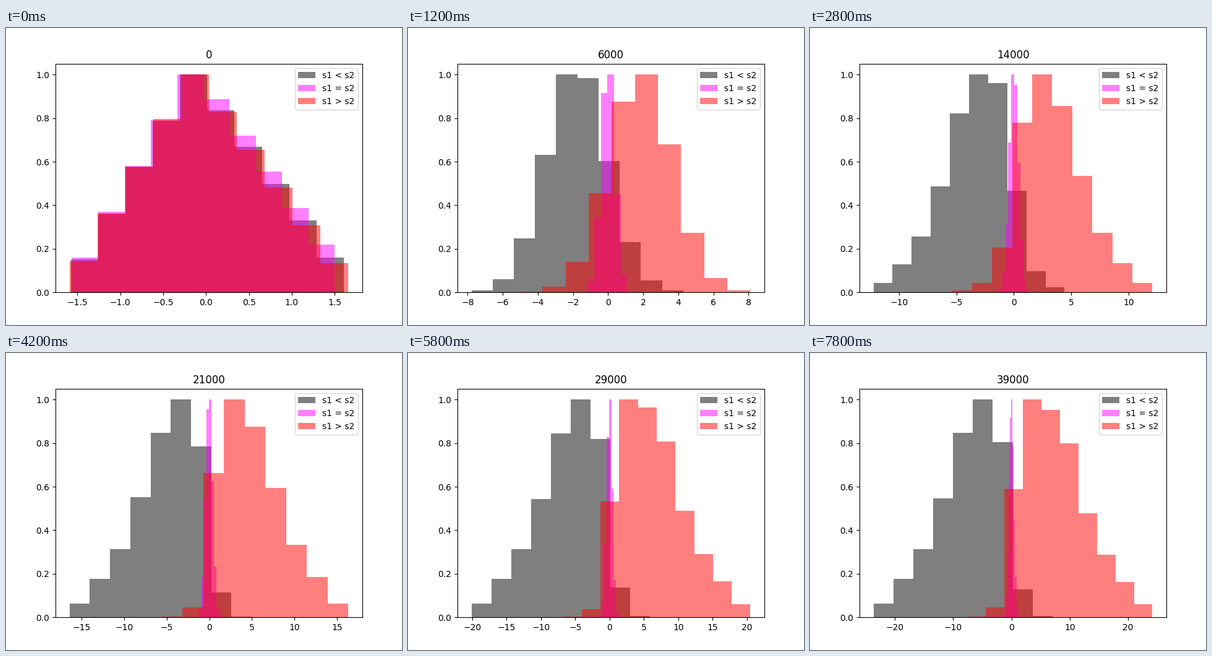
Write a matplotlib script that moves like this. It is 640 px wide and 480 px high and loops after 8000 ms.

```python
import numpy as np
import matplotlib.pyplot as plt
from matplotlib.animation import FuncAnimation

FRAMES, INTERVAL = 40, 200
STEP = 1000
BINS = 10

# Lowest and highest sample of each group at a few key times.
KEYS = np.array([0, 6, 14, 21, 29, 34, 39])
LESS = ([-1.575, -7.78, -12.24, -16.42, -20.11, -21.75, -23.65],
        [1.606, 4.28, 4.42, 7.36, 8.76, 9.03, 10.43])
SAME = ([-1.559, -2.30, -1.27, -1.46, -1.78, -1.30, -1.20],
        [1.498, 1.47, 1.33, 1.41, 1.60, 1.36, 1.08])
MORE = ([-1.591, -5.05, -5.40, -8.00, -6.78, -6.10, -7.60],
        [1.660, 8.11, 12.08, 16.33, 20.51, 21.94, 24.16])

# Settled shape of a drifting group; 1 on the u axis is its far end.
DRIFT_U = [-0.35, -0.22, -0.12, -0.075, 0, 0.06, 0.12, 0.2,
           0.28, 0.36, 0.41, 0.5, 0.64, 0.79, 0.93]
DRIFT_H = [0, 0.005, 0.04, 0.14, 0.51, 0.79, 0.97, 1,
           0.93, 0.83, 0.78, 0.53, 0.31, 0.17, 0.06]


def smooth(t, values):
    """Cubic Hermite curve through the values at the key times."""
    values = np.array(values)
    i = min(np.searchsorted(KEYS, t, side="right") - 1, len(KEYS) - 2)
    span = KEYS[i + 1] - KEYS[i]
    u = (t - KEYS[i]) / span
    slope = np.gradient(values, KEYS, edge_order=2) * span
    return ((1 + 2 * u) * (1 - u) ** 2 * values[i]
            + u * (1 - u) ** 2 * slope[i]
            + u * u * (3 - 2 * u) * values[i + 1]
            + u * u * (u - 1) * slope[i + 1])


def mix(a, b, t, start, end):
    w = np.clip((t - start) / (end - start), 0, 1)
    return a + (b - a) * w


def tent(x):
    return np.interp(x, [-1.64, -0.14, 1.75], [0, 1, 0])


def bell(x, mid, sd):
    return np.exp(-((x - mid) / sd) ** 2 / 2)


def still_shape(t, x):
    return mix(tent(x), bell(x, 0, 0.4), t, 0, 6)


def drift_shape(t, x, far):
    """A tent turns into a bell, which then leans away from zero."""
    u = x / far
    early = mix(tent(x), bell(u, 0.23, 0.225), t, 0, 6)
    return mix(early, np.interp(u, DRIFT_U, DRIFT_H), t, 6, 18)


def histogram(t, ends, side):
    lo, hi = (smooth(t, end) for end in ends)
    edges = np.linspace(lo, hi, BINS + 1)
    mids = (edges[:-1] + edges[1:]) / 2
    if side:
        heights = drift_shape(t, mids, hi if side > 0 else lo)
    else:
        heights = still_shape(t, mids)
    return edges, heights / heights.max()


SERIES = [
    (LESS, -1, "black", "s1 < s2"),
    (SAME, 0, "magenta", "s1 = s2"),
    (MORE, 1, "red", "s1 > s2"),
]

fig, ax = plt.subplots(figsize=(6.4, 4.8), dpi=100)


def draw(t):
    ax.clear()
    for ends, side, color, label in SERIES:
        edges, heights = histogram(t, ends, side)
        ax.bar(edges[:-1], heights, np.diff(edges), align="edge",
               color=color, alpha=0.5, label=label)
    ax.set_ylim(0, 1.05)
    ax.set_title(str(t * STEP))
    ax.legend(loc="upper right")


anim = FuncAnimation(fig, draw, frames=FRAMES, interval=INTERVAL,
                     init_func=lambda: draw(0), repeat=True, repeat_delay=0)
plt.show()
```
